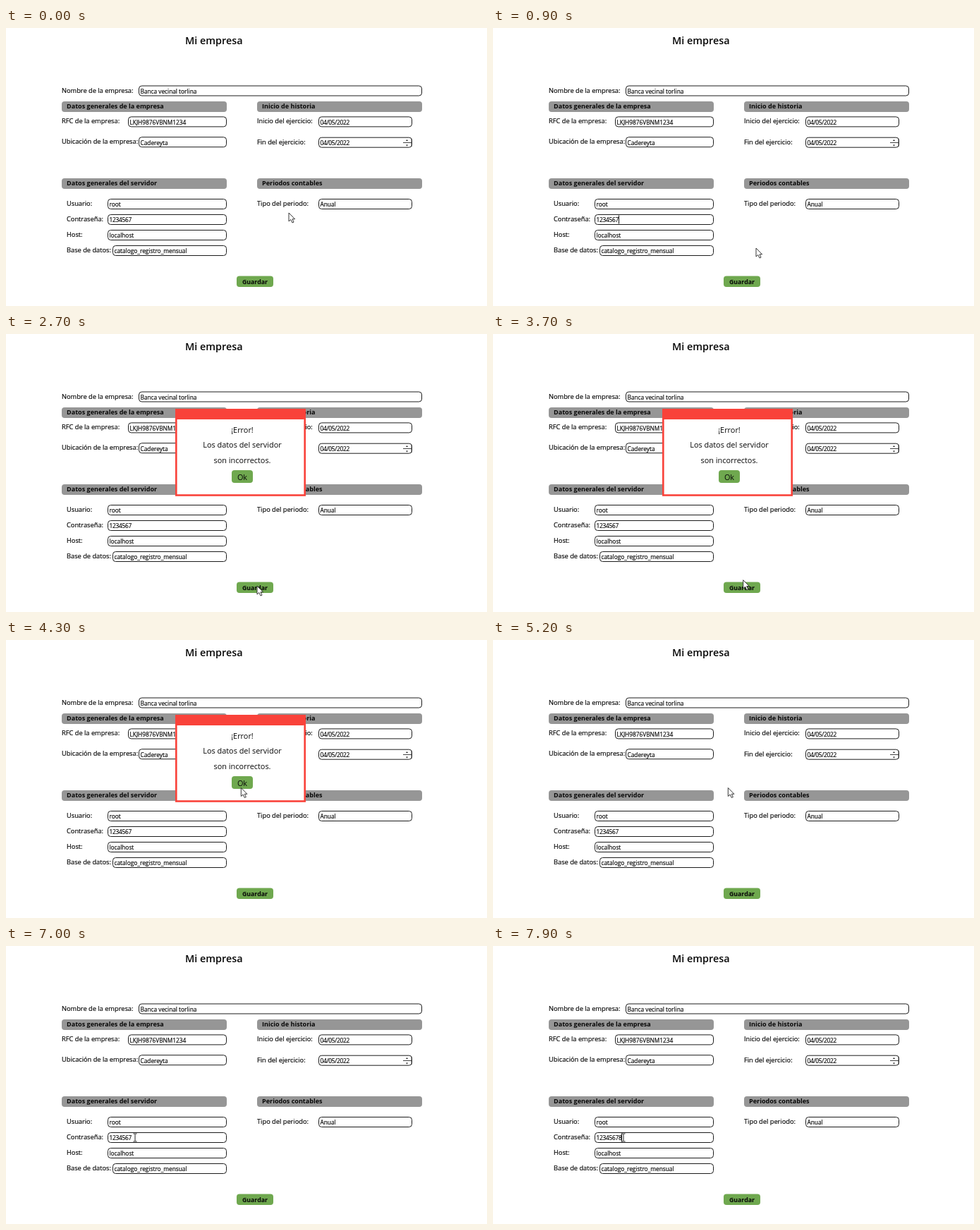
Recreate the animation shown at these times as an HTML page. Size 682 by 394 pixels, loop 8000 ms.

```html
<!DOCTYPE html>
<html lang="es">
<head>
<meta charset="utf-8">
<title>Mi empresa</title>
<style>
  html, body { margin: 0; width: 100%; height: 100%; overflow: hidden; background: #fff; }
  svg { display: block; width: 682px; height: 394px; font-family: "Open Sans", "Noto Sans", sans-serif; }
  text { fill: #080808; white-space: pre; }
  .title { font-size: 14.4px; font-weight: 600; }
  .label { font-size: 9.25px; }
  .value { font-size: 8.3px; }
  .label, .value { stroke: #080808; stroke-width: .18px; }
  .digits { letter-spacing: -.25px; }
  .head { font-size: 9.05px; font-weight: 700; }
  .save { font-size: 8.8px; font-weight: 700; }
  .msg { font-size: 10.9px; }
  .mid { text-anchor: middle; }
  .field { fill: #fff; stroke: #1c1c1c; }
  .bar { fill: #969696; }
  .button { fill: #6fa84f; }
</style>
</head>
<body>
<svg viewBox="0 0 682 394">
  <g id="form"></g>
  <path id="caret" d="M178.5 265.5v12" stroke="#111" fill="none"/>
  <g id="dialog"></g>
  <path id="arrow" d="M0 0V12L2.8 9.5L5 14L7 13.1L5 8.8H8.6Z" fill="#fff" stroke="#222" stroke-width=".9"/>
  <path id="beam" d="M-2.5 -5.5H-.7L0 -5L.7 -5.5H2.5M0 -5V5M-2.5 5.5H-.7L0 5L.7 5.5H2.5" fill="none" stroke="#222"/>
</svg>
<script>
const $ = id => document.getElementById(id);
const form = $("form"), dialog = $("dialog");

function add(parent, tag, attrs, content = "") {
  const el = document.createElementNS("http://www.w3.org/2000/svg", tag);
  for (const key in attrs) el.setAttribute(key, attrs[key]);
  el.textContent = content;
  return parent.appendChild(el);
}
const text = (parent, x, y, cls, content) => add(parent, "text", { x, y, class: cls }, content);
const box = (parent, x, y, width, height, cls, rx = 4) =>
  add(parent, "rect", { x, y, width, height, rx, class: cls });

// label, label x, field left, field right, field top, value
const fields = [
  ["Nombre de la empresa:", 79, 188, 590, 81.5, "Banca vecinal torlina"],
  ["RFC de la empresa:", 79, 173, 313, 125.4, "LKJH9876VBNM1234"],
  ["Ubicación de la empresa:", 79, 188, 313, 154.2, "Cadereyta"],
  ["Inicio del ejercicio:", 356, 443, 576, 125.4, "04/05/2022"],
  ["Fin del ejercicio:", 356, 443, 576, 154.7, "04/05/2022"],
  ["Usuario:", 86, 144, 313, 242, "root"],
  ["Contraseña:", 86, 144, 313, 264, "1234567"],
  ["Host:", 86, 144, 313, 286, "localhost"],
  ["Base de datos:", 86, 151, 313, 308, "catalogo_registro_mensual"],
  ["Tipo del periodo:", 356, 443, 576, 242, "Anual"]
];
const heads = [
  [79, 104, "Datos generales de la empresa"],
  [356, 104, "Inicio de historia"],
  [79, 213, "Datos generales del servidor"],
  [356, 213, "Periodos contables"]
];

text(form, 254, 22.5, "title", "Mi empresa");
for (const [x, y, name] of heads) {
  box(form, x, y, 234, 15, "bar");
  text(form, x + 7, y + 9.5, "head", name);
}
const values = fields.map(([name, x, left, right, top, value]) => {
  text(form, x, top + 10, "label", name);
  box(form, left + .5, top + .5, right - left - 1, 14, "field");
  return text(form, left + 2.5, top + 11.3, /^[\d/]+$/.test(value) ? "value digits" : "value", value);
});
const password = values[6];

// spin buttons of the end date
add(form, "path", { d: "M563 162.5H575M575 157V168", stroke: "#444", fill: "none" });
add(form, "path", { d: "M567 160L568.5 158L570 160ZM567 165.5L568.5 167.5L570 165.5Z", fill: "#222" });

box(form, 327, 351.5, 52, 15.5, "button");
text(form, 353, 363, "save mid", "Guardar");

add(dialog, "rect", { x: 241.3, y: 107.3, width: 182.4, height: 121.2, fill: "#fff", stroke: "#f9423a", "stroke-width": 2.6 });
add(dialog, "path", { d: "M240 106H425V118Q424 121 421 121H240Z", fill: "#f9423a" });
["¡Error!", "Los datos del servidor", "son incorrectos."].forEach((line, i) =>
  text(dialog, 335, 139.8 + i * 21.6, "msg mid", line));
box(dialog, 320, 193, 30, 18, "button");
text(dialog, 335, 207, "msg mid", "Ok");

// start, end, destination of each pointer move
const moves = [
  [100, 700, 373, 312],
  [900, 1600, 356, 357],
  [3600, 4300, 333.3, 207 + 2.5],
  [5800, 6250, 183, 271.5],
  [7700, 7800, 185, 271.5]
];
const ease = p => p * p * (3 - 2 * p);

function pointer(t) {
  let x = 401, y = 262;
  for (const [start, end, toX, toY] of moves) {
    const p = ease(Math.min(1, Math.max(0, (t - start) / (end - start))));
    x += (toX - x) * p;
    y += (toY - y) * p;
  }
  return [x, y];
}

function caretOn(t) {
  if (t < 2700) return t % 1000 >= 500;
  return t >= 5400 && (t >= 7800 || (t - 5400) % 1000 < 500);
}

const show = (el, on) => el.setAttribute("visibility", on ? "visible" : "hidden");

function draw(t) {
  const open = t >= 2700 && t < 4900, typed = t >= 7800;
  const [x, y] = pointer(t);
  const overField = !open && fields.some(([, , left, right, top]) =>
    x > left && x < right && y > top && y < top + 15);

  show(dialog, open);
  password.textContent = typed ? "12345678" : "1234567";
  show($("caret"), caretOn(t));
  $("caret").setAttribute("transform", `translate(${typed ? 4 : 0})`);
  for (const id of ["arrow", "beam"]) {
    $(id).setAttribute("transform", `translate(${x} ${y})`);
    show($(id), (id === "beam") === overField);
  }
}

const begin = performance.now();
function tick() {
  draw((performance.now() - begin) % 8000);
  requestAnimationFrame(tick);
}
tick();
</script>
</body>
</html>
```
